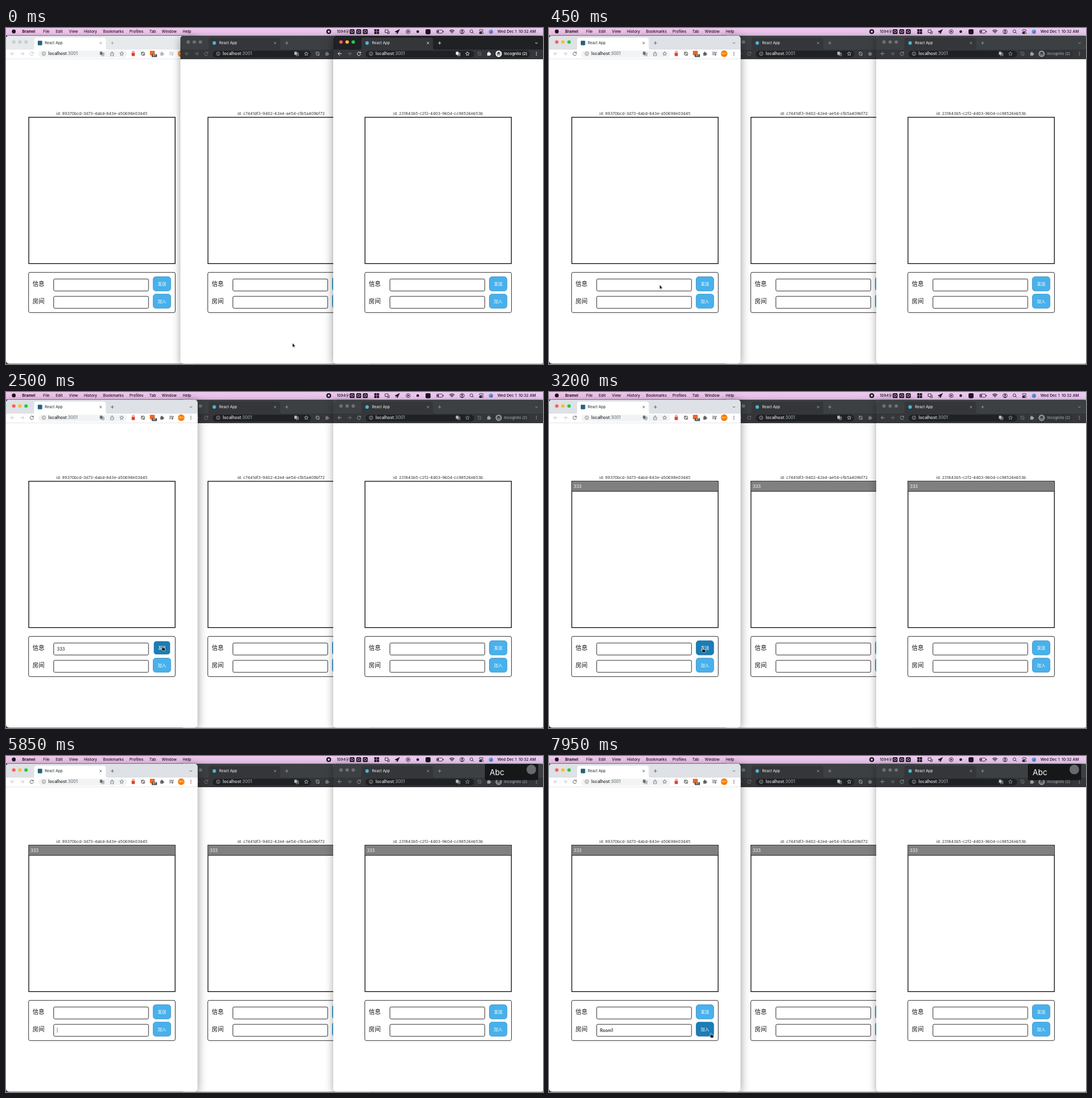
Recreate the animation shown at these times as an HTML page. Size 896 by 560 pixels, loop 8000 ms.

```html
<!DOCTYPE html>
<html lang="en">
<head>
<meta charset="utf-8">
<title>Chat room demo</title>
<style>
html, body { margin: 0; width: 100%; height: 100%; overflow: hidden; background: #fff; }
svg { display: block; width: 896px; height: 560px; font-family: Inter, "Noto Sans CJK SC", "Noto Sans CJK", sans-serif; }
text { white-space: pre; }
.win { filter: drop-shadow(0 3px 8px rgba(0,0,0,.42)); }
.win.off { filter: drop-shadow(0 3px 7px rgba(0,0,0,.36)); }
.pop { filter: drop-shadow(0 1px 1.2px rgba(0,0,0,.4)); }
</style>
</head>
<body>
<svg id="stage" viewBox="0 0 896 560">
  <defs>
    <linearGradient id="bar"><stop offset="0" stop-color="#f0c6ec"/><stop offset="1" stop-color="#eacbf1"/></linearGradient>
    <linearGradient id="desk"><stop offset=".33" stop-color="#3b3048"/><stop offset=".33" stop-color="#9a9a9e"/></linearGradient>
    <linearGradient id="orb" x2="1" y2="1"><stop offset="0" stop-color="#54c8e8"/><stop offset="1" stop-color="#6a4fb0"/></linearGradient>
  </defs>
  <rect width="896" height="560" fill="url(#desk)"/>
  <g id="menu"></g>
  <g id="wins"></g>
  <g id="over"></g>
  <g id="cursor"></g>
</svg>
<script>
const LOOP = 8000, TICK = 50;
const $ = id => document.getElementById(id);

// --- drawing helpers ---
const rect = (x, y, w, h, fill, r = 0, more = '') =>
  `<rect x="${x}" y="${y}" width="${w}" height="${h}" rx="${r}" fill="${fill}" ${more}/>`;
const dot = (x, y, r, fill, more = '') => `<circle cx="${x}" cy="${y}" r="${r}" fill="${fill}" ${more}/>`;
const ring = (x, y, r, c, w = .8) => dot(x, y, r, 'none', `stroke="${c}" stroke-width="${w}"`);
const text = (x, y, s, size, fill, more = '') =>
  `<text x="${x}" y="${y}" font-size="${size}" fill="${fill}" ${more}>${s}</text>`;
const line = (x, y, d, c, w = .9, fill = 'none') =>
  `<path transform="translate(${x} ${y})" d="${d}" fill="${fill}" stroke="${c}" stroke-width="${w}"/>`;
const MID = 'text-anchor="middle"';

const icon = {
  back: (x, y, c) => line(x, y, 'M3 0H-3M0-3L-3 0 0 3', c),
  next: (x, y, c) => line(x, y, 'M-3 0H3M0-3L3 0 0 3', c),
  reload: (x, y, c) => line(x, y, 'M2.3-1.7A2.9 2.9 0 1 0 2.9.5M2.8-3.2V-1.1H.7', c),
  info: (x, y, c) => ring(x, y, 2.9, c, .7) + line(x, y, 'M0-.4V1.6M0-1.6V-.9', c, .7),
  lang: (x, y, c) => rect(x - 3.4, y - 3.3, 4.4, 5.2, c, .6) + line(x, y, 'M1.5-1.3H3.4V3.4H-.4V2.2M.6 1.9L1.7-.2 2.8 1.9', c, .7),
  share: (x, y, c) => line(x, y, 'M-1.2-.9H-2.6V3.3H2.6V-.9H1.2M0 1.3V-3.2M-1.5-1.8L0-3.3 1.5-1.8', c, .7),
  star: (x, y, c) => line(x, y, 'M0-3.2L.9-1.1 3.2-.9 1.5.6 2 2.9 0 1.7-2 2.9-1.5.6-3.2-.9-.9-1.1Z', c, .75),
  slash: (x, y, c) => ring(x, y, 2.8, c, 1) + line(x, y, 'M-2.8-3.2L2.8 3.2', c, .9),
  puzzle: (x, y, c) => rect(x - 3, y - 1.9, 5, 5, c, .5) + dot(x - .5, y - 2.3, 1.1, c) + dot(x + 2.3, y + .6, 1.1, c),
  list: (x, y, c) => line(x, y, 'M-3.5-2.4H1.5M-3.5-.3H1.5M-3.5 1.8H-.5M2.4 2.2V-2.3H4', c, .9) + dot(x + 1.5, y + 2, 1.1, c),
  more: (x, y, c) => [-2.4, 0, 2.4].map(d => dot(x, y + d, .75, c)).join(''),
  chevron: (x, y, c) => line(x, y, 'M-2-1L0 1 2-1', c, .9),
  close: (x, y, c) => line(x, y, 'M-1.8-1.8L1.8 1.8M1.8-1.8L-1.8 1.8', c, .8),
  plus: (x, y, c) => line(x, y, 'M-2.7 0H2.7M0-2.7V2.7', c, .8)
};
const row = (y, items) => items.map(([name, x, c]) => icon[name](x, y, c)).join('');

// --- menu bar ---
function menuBar() {
  const k = '#1d1320';
  const names = [['File', 62], ['Edit', 83], ['View', 105], ['History', 130], ['Bookmarks', 162],
    ['Profiles', 206], ['Tab', 239], ['Window', 260], ['Help', 295]];
  return rect(0, 0, 896, 12.5, 'url(#bar)') + dot(13, 5.7, 3.2, k) +
    text(27, 8.1, 'Bramel', 6.4, k, 'font-weight="700"') +
    names.map(([s, x]) => text(x, 8.1, s, 6.4, k, 'font-weight="500"')).join('') +
    dot(538.5, 6, 4, k) + rect(537, 4.5, 3, 3, '#fff', .5) +
    text(552, 8.2, '1094字', 6.2, k, 'font-weight="500"') +
    [577.5, 588.5, 599.5].map(x => rect(x - 4, 2, 8, 8, k, 1.5) + ring(x, 6, 2, '#f0d0ee', .9)).join('') +
    [[614.5, 2], [618.8, 2], [614.5, 6.3], [618.8, 6.3]].map(([x, y]) => rect(x, y, 3.7, 3.7, k)).join('') +
    line(636, 6, 'M-3.5-3H1.5V1.5H-3.5ZM-.5 3.2H3.4V-1', k, .8) +
    line(653, 6, 'M3.8-3.8L-4 0-1.2 1 0 3.8ZM-2 2L-3.6 3.6', k, .6, k) +
    ring(671, 6, 3.3, k) + line(671, 6, 'M-1-1.6L1.8 0-1 1.6Z', k, .3, k) +
    dot(687, 6, 2.2, k) + rect(700, 2, 8.4, 8.4, k, 1.8) +
    rect(718.5, 3.4, 10, 5.2, 'none', 1.4, `stroke="${k}" stroke-width=".7"`) + rect(719.6, 4.5, 2.6, 3, k, .4) + rect(729.2, 5, 1, 2, k) +
    line(744, 6, 'M-4.2-1.2Q0-4.8 4.2-1.2M-2.7.5Q0-1.8 2.7.5M-1.1 2.2Q0 1.2 1.1 2.2', k, 1.1) +
    ring(761, 6, 3.5, k) + dot(761, 5, 1.3, k) + line(761, 6, 'M-2.1 2.4Q0 .4 2.1 2.4Z', k, .3, k) +
    ring(776.5, 5.4, 2.4, k) + line(776.5, 5.4, 'M1.8 1.8L3.8 3.8', k) +
    rect(789.7, 2.6, 6.6, 2.8, 'none', 1.4, `stroke="${k}" stroke-width=".7"`) + rect(789.5, 6.6, 7, 3.2, k, 1.6) + dot(794.8, 8.2, 1, '#eee') +
    dot(809, 6, 3.5, 'url(#orb)') +
    text(820, 8.1, 'Wed Dec 1&#160; 10:32 AM', 6.4, k, 'font-weight="500"');
}

// --- browser windows ---
const wins = [
  { x: 0, w: 319.5, page: 0, id: '99370bcd-3d73-4abd-843e-a50698e03d45' },
  { x: 291, w: 320, page: 299, id: 'c7441df3-9402-42e4-ae54-cfb5a409bf72', dark: 1 },
  { x: 546, w: 352, page: 561, id: '231843b5-c2f2-4d03-9604-cc98526eb53b', dark: 1, secret: 1 }
];

function frame({ x, w, dark, secret }, on) {
  const strip = dark ? (on ? '#202124' : '#3c4043') : (on ? '#dee1e6' : '#e7eaed');
  const tool = dark ? '#35363a' : '#fff', pill = dark ? '#202124' : '#f1f3f4';
  const ink = dark ? (on ? '#f1f3f4' : '#9aa0a6') : (on ? '#4d5156' : '#9a9da1');
  const weak = dark ? '#74787d' : '#bdc1c6', host = dark ? '#e8eaed' : '#202124';
  const lights = on ? ['#ff5f57', '#febc2e', '#28c840'] : Array(3).fill(dark ? '#6c6f73' : '#c9cccf');
  const pillEnd = secret ? 781 : x + (dark ? 218 : 202);
  let s = `<g class="win${on ? '' : ' off'}">` + rect(x, 13, w, 546.4, '#fff', 5) + '</g>' +
    `<path d="M${x} 52V18q0-5 5-5h${w - 10}q5 0 5 5V52Z" fill="${strip}"/>` +
    `<path d="M${x + 43} 36.5q4 0 4-4V20q0-4 4-4h111.500q4 0 4 4v12.500q0 4 4 4Z" fill="${tool}"/>` +
    rect(x, 36, w, 15.5, tool) + (dark ? '' : rect(x, 51.2, w, .5, '#dadce0')) +
    lights.map((c, i) => dot(x + 13 + i * 10.2, 23.3, 2.9, c)).join('') +
    (dark ? dot(x + 56.5, 25, 2.9, '#49b8d3') : rect(x + 53, 21.3, 7.4, 7.4, '#21657d', 1)) +
    text(x + 64.8, 27.2, 'React App', 6, dark ? '#dfe1e5' : '#3c4043', 'font-weight="500"') +
    row(25, [['close', x + 158, ink], ['plus', x + 177.5, ink]]) +
    rect(x + 54, 37.7, pillEnd - x - 54, 11.6, pill, 5.8) +
    text(x + 70.8, 45.1, `localhost<tspan fill="${dark ? '#9aa0a6' : '#70757a'}">:3001</tspan>`, 7, host, 'font-weight="500"') +
    row(42.8, [['back', x + 11, secret ? ink : weak], ['next', x + 27, weak],
      ['reload', x + 43, secret || (on && !dark) ? ink : weak], ['info', x + 63, dark ? '#c4c7cb' : '#5f6368']]);
  if (secret) {
    s += row(42.8, [['lang', 754, on ? ink : '#b9bcc0'], ['star', 770, ink], ['slash', 790, '#686b70'], ['puzzle', 806, ink], ['more', 885, ink]]) +
      rect(815, 37.2, 59, 12.4, on ? '#202124' : '#303135', 6.2) + dot(822, 43, 5.4, on ? '#f1f3f4' : '#8c9095') +
      line(822, 43, 'M-3.4-.4H3.4M-1.7-.7L-1.2-2.6H1.2L1.7-.7Z', '#303135', .7, '#303135') +
      ring(820.5, 44.6, 1, '#303135', .7) + ring(823.5, 44.6, 1, '#303135', .7) +
      text(831, 45.1, 'Incognito (2)', 6.4, on ? '#fff' : '#9aa0a6', 'font-weight="500"') + icon.chevron(885, 25, ink);
  } else if (dark) {
    s += row(42.8, [['lang', 484.5, '#b9bcc0'], ['star', 501, '#c4c7cb'], ['slash', 520, ink], ['puzzle', 536, '#74787d']]);
  } else {
    s += row(42.8, [['lang', 160, '#6b6f74'], ['share', 177, '#5f6368'], ['star', 193, '#5f6368'],
        ['slash', 228.5, '#34373a'], ['puzzle', 260.5, on ? '#5f6368' : '#b4b7ba'], ['list', 276, on ? '#4d5156' : '#b4b7ba'],
        ['more', 308.5, ink]]) +
      rect(209.6, 41.2, 5.4, 5.5, '#e0452c', .8) + line(212.3, 41, 'M-1.4.4V-1.200A1.400 1.400 0 0 1 1.400-1.200V.4', '#e0452c', .9) +
      rect(240, 38, 8.3, 7.6, '#f2691f', 1) + rect(243, 43.6, 9, 4.8, '#55585c', 1) + text(247.5, 47.3, 'off', 3.8, '#fff', MID) +
      dot(292.3, 42.8, 5.5, '#f57c00') + text(292.3, 44.2, 'NKO', 3.8, '#fff', MID) + icon.chevron(308.5, 25, ink);
  }
  return s;
}

const box = (x, y, w, h, r) => rect(x, y, w, h, '#fff', r, 'stroke="#222" stroke-width=".9"');

function button(y, label, mode) {
  const size = mode === 'press' ? .9 : 1;
  return `<g transform="translate(260.200 ${y}) scale(${size})">` +
    rect(-14.7, -11.8, 29.4, 23.6, mode ? '#1a7db6' : '#48b1ec', 4.5, `stroke="${mode ? '#17699a' : '#2b86ba'}" stroke-width=".7"`) +
    text(0, 2.5, label, 7, '#fff', MID) + '</g>';
}

function page({ page: x, id }, s, own) {
  const input = { msg: own ? s.msg : '', room: own ? s.room : '' };
  return `<g transform="translate(${x} 0)">` +
    text(160, 145.1, 'id: ' + id, 6.7, '#333', MID) +
    rect(38, 148.8, 244.2, 243.8, '#fff', 0, 'stroke="#111" stroke-width="1.3"') +
    (s.sent ? rect(38.6, 149.4, 243, 16, '#808080') + rect(38, 165.2, 244.2, .9, '#111') + text(41, 160, '333', 7.1, '#fff') : '') +
    box(37.7, 407.3, 244.7, 67, 2.5) +
    text(44.2, 430.3, '信息', 10, '#111', 'font-weight="500"') + text(44.2, 459.2, '房间', 10, '#111', 'font-weight="500"') +
    box(79.6, 418.3, 158.2, 20, 2) + box(79.6, 447.2, 158.2, 20, 2) +
    text(85, 430.7, input.msg, 7.1, '#111') + text(85, 459.6, input.room, 7.1, '#111', 'font-weight="500"') +
    button(426.4, '发送', own && s.send) + button(455.3, '加入', own && s.join) + '</g>';
}

const pen = document.createElement('canvas').getContext('2d');
function caret(s) {
  if (!s.caret) return '';
  const room = s.field === 'room';
  pen.font = (room ? 500 : 400) + ' 71px Inter, sans-serif';
  const x = 85.1 + pen.measureText(s[s.field]).width / 10;
  return rect(x, room ? 452.8 : 423.9, .6, 8.4, '#444');
}

function popup(y, items, alpha) {
  const h = items.length * 18 + (items.length > 1 ? 5 : 9);
  return `<g opacity="${alpha}"><g class="pop">` + rect(79.6, y, 158.2, h, '#fff', 1) + '</g>' +
    items.map((s, i) => text(85.5, y + (items.length > 1 ? 12.7 : 15.7) + i * 18, s, 6.7, '#111', 'font-weight="500"')).join('') + '</g>';
}

const badge = () => rect(799, 13.3, 89, 27, '#161719', 2) +
  text(807, 32.4, 'Abc', 13, '#fff') + dot(876.5, 22.5, 8, '#66696d');

const pointers = {
  arrow: '<path d="M0 0V7.200L1.700 5.700 2.800 8.200 3.900 7.700 2.800 5.300H5Z" stroke="#fff" stroke-width=".6" fill="#000"/>',
  beam: line(0, 0, 'M-1.6-4.300Q0-4.300 0-3.300 0-4.300 1.600-4.300M0-3.500V3.500M-1.600 4.300Q0 4.300 0 3.300 0 4.300 1.600 4.300', '#111', .8),
  hand: '<path d="M-1.500 1V-3.500q.8-1 1.500 0V-.8l3 .6q.9.300.8 1.200L3.200 4.200H-.8L-3.400.8q.2-1 1.200-.4Z" stroke="#fff" stroke-width=".6" fill="#111"/>'
};

// --- timeline ---
const track = {
  front: [[0, 2], [450, 0]],
  msg: [[0, ''], [1750, '3'], [1850, '33'], [1950, '333'], [2550, '']],
  room: [[0, ''], [6400, 'R'], [6500, 'Ro'], [6650, 'Roo'], [6850, 'Room'], [7150, 'Room1']],
  sent: [[0, 0], [2550, 1]],
  field: [[0, 'msg'], [2550, 'room']],
  caret: [[0, 0], [550, 1], [850, 0], [1150, 1], [2400, 0], [4000, 1], [4550, 0], [5000, 1], [5550, 0],
    [5850, 1], [6150, 0], [6400, 1], [7450, 0], [7700, 1], [7850, 0]],
  hint: [[0, 0], [1750, 1], [2400, 0]],
  rooms: [[0, 0], [4000, .4], [4100, .8], [4150, 1], [5000, .5], [5050, 0]],
  press: [[0, 0], [2450, 1], [2550, 0]],
  hidden: [[0, 0], [4750, 1], [7450, 0]],
  badge: [[0, 0], [4550, 1]]
};
const path = [[0, 478, 525], [400, 184.6, 428], [550, 184.6, 428], [1300, 185.4, 428], [1350, 186, 428], [1950, 186, 428],
  [2350, 262, 427], [3050, 262, 427], [3900, 207.5, 463], [7400, 207.5, 463], [7650, 208, 465], [7950, 271, 465.5]];

const at = (steps, t) => steps.filter(s => s[0] <= t).pop()[1];
function place(t) {
  let i = path.findIndex(p => p[0] > t);
  if (i < 0) return path[path.length - 1].slice(1);
  const [a, b] = [path[i - 1], path[i]], u = (t - a[0]) / (b[0] - a[0]), e = u * u * (3 - 2 * u);
  return [a[1] + (b[1] - a[1]) * e, a[2] + (b[2] - a[2]) * e];
}
const within = ([x, y], l, t, r, b) => x > l && x < r && y > t && y < b;

function state(t) {
  const s = {};
  for (const k in track) s[k] = at(track[k], t);
  s.pos = place(t);
  const live = !s.hidden && !s.front;
  s.send = live && within(s.pos, 245, 414, 275, 439) && (s.press ? 'press' : 'hover');
  s.join = live && within(s.pos, 245, 443, 275, 468) && 'hover';
  const inField = within(s.pos, 79, 418, 238, 439) || within(s.pos, 79, 447, 238, 468);
  s.pointer = s.send || s.join ? 'hand' : inField && t >= 550 ? 'beam' : 'arrow';
  return s;
}

let last = -1;
function draw(now) {
  const t = Math.floor(now % LOOP / TICK) * TICK;
  if (t !== last) {
    last = t;
    const s = state(t), order = s.front ? [0, 1, 2] : [1, 2, 0];
    $('wins').innerHTML = order.map(i => frame(wins[i], i === s.front) + page(wins[i], s, i === 0)).join('');
    $('over').innerHTML = caret(s) + (s.hint ? popup(439.2, ['33333333'], 1) : '') +
      (s.rooms ? popup(470.8, ['123', '222', '1233'], s.rooms) : '') + (s.badge ? badge() : '');
    $('cursor').innerHTML = s.hidden ? '' : pointers[s.pointer];
    $('cursor').setAttribute('transform', `translate(${s.pos})`);
  }
}
$('menu').innerHTML = menuBar();
const start = performance.now();
function loop() {
  draw(performance.now() - start);
  requestAnimationFrame(loop);
}
loop();
</script>
</body>
</html>
```
